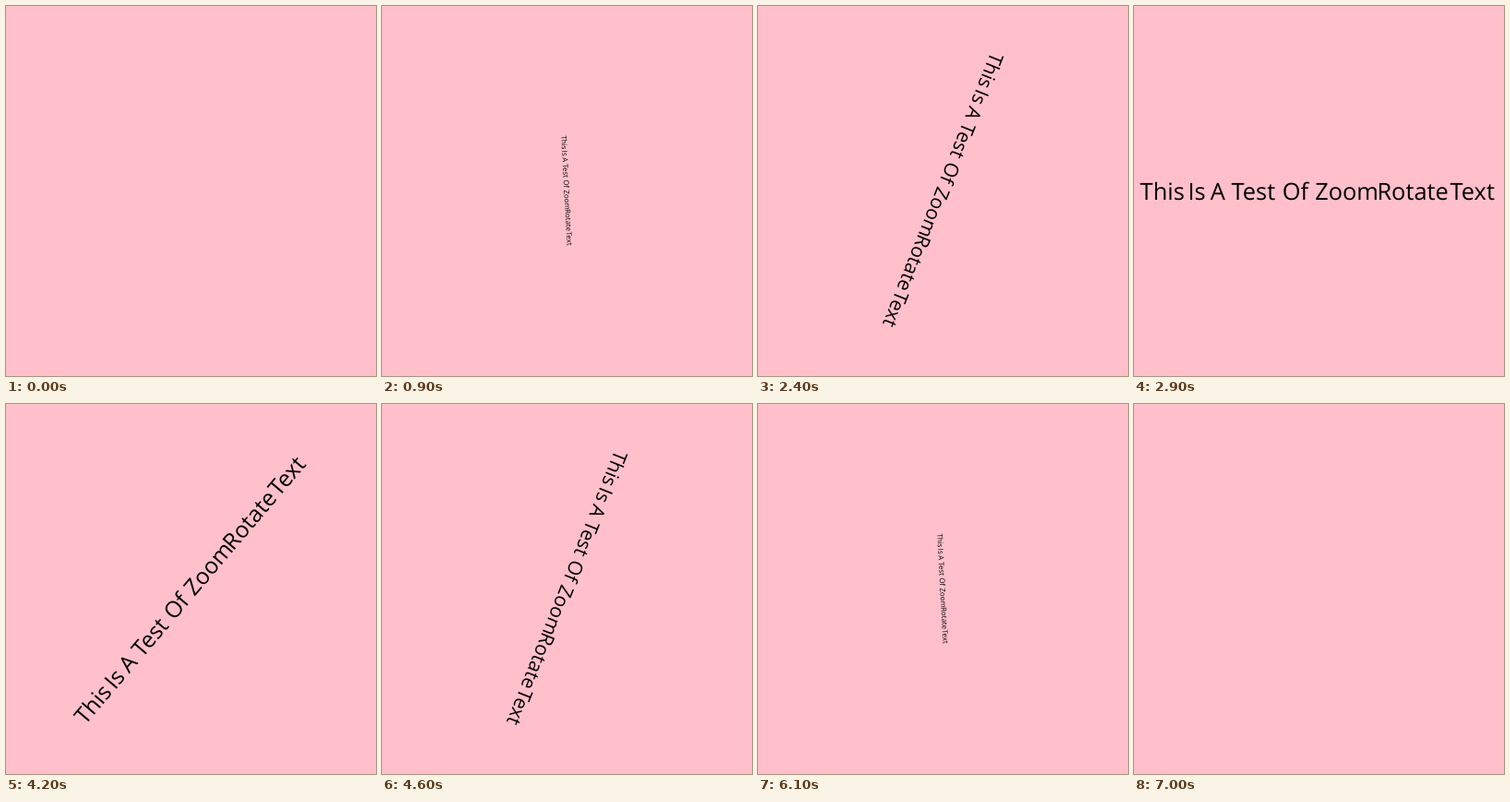
Recreate the animation shown at these times as an HTML page. Size 401 px wide and 401 px high, loop 8000 ms.

```html
<!DOCTYPE html>
<html lang="en">
<head>
<meta charset="utf-8">
<title>Zoom and rotate text</title>
<style>
  html, body { margin: 0; width: 100%; height: 100%; overflow: hidden; background: pink; }
  svg { display: block; width: 100%; height: 100%; }
  text { font: 25.4px "Open Sans", "Noto Sans", sans-serif; text-rendering: geometricPrecision; white-space: pre; }
</style>
</head>
<body>
<svg viewBox="0 0 401 401">
  <rect width="401" height="401" fill="pink"/>
  <text id="label" y="9"></text>
</svg>
<script>
const LOOP = 8000, STEP = 100, STEPS = 29, TURNS = 4;
const SHRINK_END = 70; // step at which the text has vanished again
const label = document.getElementById('label');

// Each word with its left edge relative to the centre of the line.
const words = [
  ['This ', -193.6], ['Is ', -141.8], ['A ', -117.5], ['Test ', -94.7],
  ['Of ', -39.5], ['Zoom', -4], ['Rotate', 63.2], ['Text', 142.4]
];
for (const [word, x] of words) {
  const span = document.createElementNS('http://www.w3.org/2000/svg', 'tspan');
  span.setAttribute('x', x);
  span.textContent = word;
  label.append(span);
}

function draw(time) {
  const tick = Math.floor((time % LOOP) / STEP);
  const step = Math.max(0, Math.min(tick, STEPS, SHRINK_END - tick));
  const progress = step / STEPS;
  label.setAttribute('visibility', step ? 'visible' : 'hidden');
  label.setAttribute('transform',
    `translate(200.2 200.5) rotate(${progress * TURNS * 360}) scale(${progress})`);
}

const start = performance.now();
function frame() {
  draw(performance.now() - start);
  requestAnimationFrame(frame);
}
frame();
</script>
</body>
</html>
```
